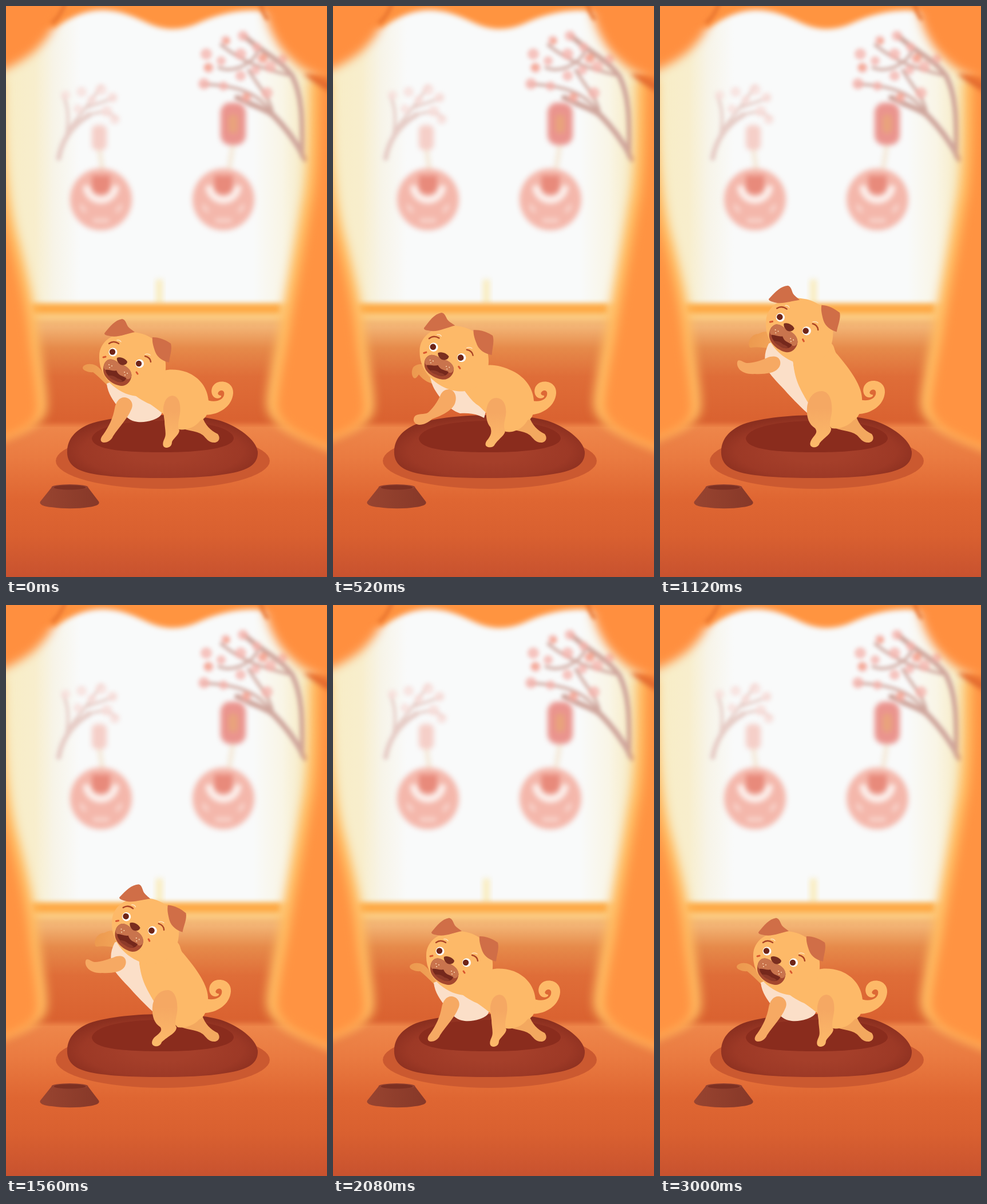
An HTML page that plays this animation: 561x998 px, repeating every 3040 ms.

```html
<!DOCTYPE html>
<html lang="en">
<head>
<meta charset="utf-8">
<title>Jumping puppy</title>
<style>
  html, body { margin: 0; width: 100%; height: 100%; overflow: hidden; background: #d9622f; }
  svg { position: absolute; left: 0; top: 0; width: 100vw; height: 100vh; }
  #room { will-change: transform; }
</style>
</head>
<body>
<svg id="room" viewBox="0 0 561 998" preserveAspectRatio="none">
  <defs>
    <filter id="b3" x="-30%" y="-30%" width="160%" height="160%" color-interpolation-filters="sRGB"><feGaussianBlur stdDeviation="3.6"/></filter>
    <filter id="b5" x="-50%" y="-100%" width="200%" height="300%" color-interpolation-filters="sRGB"><feGaussianBlur stdDeviation="4.6"/></filter>
    <filter id="b9" x="-30%" y="-30%" width="160%" height="160%" color-interpolation-filters="sRGB"><feGaussianBlur stdDeviation="8.5"/></filter>
    <linearGradient id="sky">
      <stop offset="0" stop-color="#f8edc6"/><stop offset=".09" stop-color="#f8eecd"/>
      <stop offset=".15" stop-color="#f7f4e8"/><stop offset=".23" stop-color="#f9fafa"/>
      <stop offset=".77" stop-color="#f9fafa"/><stop offset=".86" stop-color="#f9f5e6"/>
      <stop offset=".93" stop-color="#f7ebc4"/>
    </linearGradient>
    <linearGradient id="wall" x2="0" y2="1">
      <stop offset="0" stop-color="#f6bd78"/><stop offset=".12" stop-color="#f2b273"/>
      <stop offset=".3" stop-color="#e68a4a"/><stop offset=".55" stop-color="#df6d38"/>
      <stop offset="1" stop-color="#d9602f"/>
    </linearGradient>
    <linearGradient id="floor" x2="0" y2="1">
      <stop offset="0" stop-color="#ee864a"/><stop offset=".2" stop-color="#ea7b41"/>
      <stop offset=".48" stop-color="#df6632"/><stop offset=".72" stop-color="#d96030"/>
      <stop offset="1" stop-color="#c8522f"/>
    </linearGradient>
    <radialGradient id="cushion" cy=".58" r=".56">
      <stop offset=".3" stop-color="#a53f2a"/><stop offset=".75" stop-color="#9d3926"/>
      <stop offset="1" stop-color="#8b2f1f"/>
    </radialGradient>
    <linearGradient id="bowl"><stop offset="0" stop-color="#984430"/><stop offset="1" stop-color="#873828"/></linearGradient>
    <g id="medallion">
      <circle r="54" fill="#f4b7ab"/>
      <path d="M-25 -24A25 25 0 0 0 25 -24" fill="none" stroke="#fcefeb" stroke-width="13"/>
      <path d="M-36 10L-27 22M36 10L27 22M-14 37H14" stroke="#f8d6ce" stroke-width="7"/>
      <path d="M-16 -42H16V-22Q14 -9 0 -9T-16 -22Z" fill="#e88a7b"/>
    </g>
    <path id="left" d="M-60 90L-4 130C-4 250 4 340 20 400C36 460 50 520 56 570C62 620 72 670 72 700C70 730 40 745 -60 775Z"/>
    <path id="right" d="M620 90L529 130C528 230 528 300 516 350C504 420 488 500 478 560C468 610 457 660 455 695C458 730 490 750 620 795Z"/>
  </defs>

  <rect width="561" height="545" fill="url(#sky)"/>
  <rect x="262" y="478" width="12" height="44" fill="#f9ecc0" filter="url(#b5)"/>

  <g filter="url(#b3)" fill="none" stroke-linecap="round">
    <g stroke="#cfa69d">
      <path d="M523 268C508 238 490 214 466 190C450 178 430 174 404 160" stroke-width="10"/>
      <path d="M518 262C519 195 517 155 500 122C480 94 450 82 418 54" stroke-width="9"/>
      <path d="M466 188C440 150 400 138 344 137M500 122C460 112 420 104 376 68M440 80C430 100 400 118 372 108M466 188C462 160 440 140 424 112" stroke-width="5"/>
    </g>
    <g stroke="#e6ccc6">
      <path d="M92 266C98 232 116 208 146 190" stroke-width="9"/>
      <path d="M104 232C112 200 108 172 100 158M112 212C130 190 150 165 166 140M146 190C164 184 180 182 192 196M140 178L190 160" stroke-width="5"/>
    </g>
    <g id="blossoms"></g>
  </g>

  <g filter="url(#b5)">
    <path d="M397 240L390 284M163 248L168 284" stroke="#f2e3cc" stroke-width="6"/>
    <rect x="375" y="169" width="44" height="74" rx="17" fill="#ea948e"/>
    <rect x="389" y="190" width="16" height="32" rx="6" fill="#e9a37c"/>
    <rect x="150" y="208" width="26" height="44" rx="9" fill="#f5cfc8"/>
    <use href="#medallion" x="166" y="338"/>
    <use href="#medallion" x="380" y="338"/>
  </g>

  <rect y="538" width="561" height="200" fill="url(#wall)"/>
  <rect x="-30" y="731" width="621" height="300" fill="#ee864a" filter="url(#b5)"/>
  <rect y="736" width="561" height="262" fill="url(#floor)"/>
  <rect x="30" y="520" width="470" height="28" fill="#fccd84" filter="url(#b5)"/>
  <rect x="44" y="522" width="436" height="15" fill="#fda844" filter="url(#b5)"/>

  <use href="#left" fill="#ffbd63" filter="url(#b9)"/>
  <use href="#right" fill="#ffbd63" filter="url(#b9)"/>
  <use href="#left" x="-16" y="4" fill="#ff9342" filter="url(#b9)"/>
  <use href="#right" x="18" y="4" fill="#ff9342" filter="url(#b9)"/>

  <g filter="url(#b5)">
    <path d="M520 118Q545 142 585 158V120Z" fill="#df652c"/>
    <path d="M-20 -30H580V8H445C410 5 370 14 340 28C310 43 280 44 250 31C220 17 200 8 170 7C140 7 115 18 85 38L-20 20Z" fill="#ff9440"/>
  </g>
  <g fill="#ff8f3f">
    <path d="M-60 -60H106C97 10 86 42 62 66C42 90 10 108 -60 136Z" filter="url(#b9)"/>
    <path d="M436 -60C450 20 465 58 490 85C515 111 540 126 620 150V-60Z" filter="url(#b9)"/>
    <path d="M104 -8C98 12 90 22 80 30M444 -8C447 5 450 14 458 24" fill="none" stroke="#e8742f" stroke-width="6" filter="url(#b3)"/>
  </g>

  <ellipse cx="274" cy="795" rx="187" ry="49" fill="#cb5930"/>
  <path d="M107 777C108 757 120 742 145 731C180 719 230 715 275 715C320 715 350 718 375 725C405 735 437 757 440 779C441 800 425 812 385 818C350 824 310 825 270 825C220 825 170 823 140 815C115 808 106 795 107 777Z" fill="url(#cushion)"/>
  <path d="M150 756C152 738 200 725 275 725C350 725 395 738 398 755C398 773 340 780 275 780C205 780 152 776 150 756Z" fill="#8a2c1d"/>

  <path d="M80 841L60 866C57 871 66 875 80 876C100 879 125 879 144 876C158 874 165 871 162 866L143 841Z" fill="url(#bowl)"/>
  <ellipse cx="111.500" cy="841" rx="32" ry="5" fill="#944130"/>
  <ellipse cx="111.500" cy="841.500" rx="28" ry="4" fill="#7c3022"/>
</svg>

<svg viewBox="0 0 561 998" preserveAspectRatio="none">
  <defs>
    <linearGradient id="limb" x2="0" y2="1"><stop offset=".3" stop-color="#f5a863"/><stop offset="1" stop-color="#fdba6a"/></linearGradient>
    <linearGradient id="far"><stop offset="0" stop-color="#ec994f"/><stop offset="1" stop-color="#f2a458"/></linearGradient>
  </defs>
  <path id="paw" fill="url(#far)"/>
  <path d="M343 718C348 732 357 742 370 748C376 756 371 763 364 763C353 763 350 755 344 750C332 741 314 743 300 735Z" fill="#f3a85f"/>
  <path id="chest" fill="#fbdfc8"/>
  <path id="tail" d="M345 686C362 695 379 690 381 680C383 672 376 670 372 674C368 678 372 681 376 681C377 684 372 687 366 685C357 681 356 664 369 658C384 653 398 662 397 677C395 702 368 718 340 714Z" fill="#fdb968"/>
  <path id="body" fill="#fdb968"/>
  <path id="thigh" fill="url(#limb)"/>
  <path id="arm" fill="#f6a963"/>
  <g id="head">
    <path d="M163 612C163 585 190 569 220 570C250 571 277 590 279 625C281 660 262 681 235 682C205 684 161 655 163 612Z" fill="#fdb968"/>
    <path id="ear" d="M172 572C182 560 190 549 203 547C209 548 210 555 213 560C217 565 222 567 225 570C210 573 195 580 182 577C176 576 172 575 172 572Z" fill="#d06e47"/>
    <path d="M256 579C268 579 278 583 288 590C291 600 286 612 285 623C275 621 265 615 261 605C258 596 255 588 256 579Z" fill="#d06e47"/>
    <g fill="#fff"><circle cx="187" cy="605" r="7.500"/><circle cx="233.500" cy="625" r="7.500"/></g>
    <g fill="#6f2518"><circle cx="186" cy="604.500" r="5.200"/><circle cx="232" cy="625" r="5.200"/></g>
    <g fill="none" stroke-linecap="round">
      <path d="M180 590Q188 584 197 590M243 612Q252 614 253 622" stroke="#ad4526" stroke-width="2.400"/>
      <path d="M194 584Q199 583 201 587M243 609Q248 607 252 610" stroke="#fee5c4" stroke-width="1.300"/>
      <path d="M170 614L174 613M228 640L230 643" stroke="#d9572f" stroke-width="3"/>
    </g>
    <g id="muzzle">
      <path d="M176 620C182 615 190 618 198 625C208 628 218 634 219.500 645C219 657 210 664 202 664C188 663 170 650 170 636C170 628 172 623 176 620Z" fill="#a5482f"/>
      <path d="M176 620C182 615 190 618 198 625C210 628 219 635 219.500 645C219 651 213 655 209 650C204 648 197 647 194 639C188 641 180 637 174 636C168 633 172 623 176 620Z" fill="#c9744d"/>
      <path d="M174 636C180 635 187 639 193 637C196 646 203 646 210 650C209 657 199 660 190 654C181 649 174 643 174 636Z" fill="#75281c"/>
      <path d="M178 646Q188 645 195 651Q201 652 204 656Q196 659 189 654Q182 651 178 646Z" fill="#8d3a29"/>
      <g fill="#fbd6b0"><circle cx="180" cy="627" r="1"/><circle cx="185" cy="629" r="1"/><circle cx="181" cy="632" r="1"/><circle cx="207" cy="640" r="1"/><circle cx="212" cy="642" r="1"/><circle cx="208" cy="645" r="1"/></g>
    </g>
    <path d="M194 615C200 612 210 617 212 622C211 628 203 629 199 626C195 623 193 618 194 615Z" fill="#7a2e1f"/>
  </g>
</svg>

<script>
const LOOP = 3040, STEP = 40;
const $ = id => document.getElementById(id);

// head: dx, dy, angle, scale; ear, tail, nudge: dx, dy; muzzle: vertical scale
const rest = {
  head: "0 0 0 1", ear: "0 0", tail: "0 0", nudge: "0 0", muzzle: "1",
  paw: "M186 672C172 658 160 646 152 640C146 641 138 638 135 635C131 630 140 625 148 626C158 626 166 634 172 645L190 660Z",
  chest: "M176 660C178 678 188 690 195 700C205 715 215 724 225 726C240 730 262 724 270 716L277 703C262 698 240 690 228 680L200 650Z",
  body: "M215 650L276 637C284 635 300 634 316 640C340 650 352 668 354 690C356 708 350 722 340 724C330 738 312 742 302 740C290 725 270 708 252 696C238 690 225 682 215 670Z",
  thigh: "M291 681C302 682 306 695 304 712C302 725 299 735 303 742C302 750 292 756 290 762C290 770 284 772 280 772C273 771 273 764 277 756C281 748 277 737 277 725C275 712 274 703 276 697C278 687 283 682 291 681Z",
  arm: "M207 684C218 685 224 695 219 705C212 722 198 735 187 752C184 760 176 763 171 763C164 762 164 756 170 749C180 735 187 720 190 703C192 692 198 684 207 684Z"
};
const breathe = { ...rest, head: "-1 .5 -.5 1", tail: "-1.500 0", nudge: "-3 1" };
const lean = {
  head: "-10 -9.500 -2.700 1.030", ear: "0 0", tail: "-7 0", nudge: "0 0", muzzle: ".92",
  paw: "M182 662C170 660 158 655 150 644C147 648 145 652 141 650C136 645 137 632 143 629C150 625 156 625 162 630L185 650Z",
  chest: "M170 648C172 664 180 675 190 688C200 700 212 709 222 712C235 711 250 712 264 720L268 706C252 694 235 682 226 666L200 640Z",
  body: "M210 640L268 628C280 626 298 630 314 638C338 650 350 670 351 690C352 708 350 722 340 724C330 742 312 746 302 744C290 735 272 715 255 699C240 690 228 670 220 655Z",
  thigh: "M286 685C299 686 304 700 302 715C300 726 297 735 301 742C301 750 290 756 283 766C281 771 275 772 271 771C264 769 266 762 271 757C276 750 278 745 275 736C268 728 267 715 268 706C270 692 276 685 286 685Z",
  arm: "M203 670C212 671 218 682 213 695C208 707 190 716 173 722C167 728 158 732 151 732C141 731 138 722 144 716C152 711 163 715 168 709C178 699 183 690 187 682C190 674 195 670 203 670Z"
};
const stand = {
  head: "23 -59 4 1.020", ear: "-7 3", tail: "-4 -1.500", nudge: "0 0", muzzle: "1",
  paw: "M190 598C180 597 168 595 160 597C156 599 154 592 156 585C159 577 166 573 172 573C178 570 184 568 190 570L195 580Z",
  chest: "M190 590C182 606 181 620 188 636C196 650 210 662 222 676C235 690 247 702 257 711L262 690C246 665 235 650 232 615L200 585Z",
  body: "M232 600L300 590C306 596 304 604 310 609C326 628 352 660 353 685C354 708 345 722 338 724C328 736 310 740 300 738C288 725 268 706 258 692C244 668 233 650 232 610Z",
  thigh: "M283 673C297 674 302 692 300 712C298 724 295 733 299 738C300 748 288 753 279 764C277 771 270 772 267 771C260 769 262 762 266 756C272 748 276 745 271 738C258 730 256 715 257 702C259 685 268 673 283 673Z",
  arm: "M205 614C212 618 212 628 206 634C200 642 180 644 165 643C155 644 146 641 141 637C136 633 133 625 136 620C140 617 147 624 152 624C165 624 180 618 187 615C194 612 200 612 205 614Z"
};
const stretch = { ...stand, head: "23 -61 4.500 1.020", ear: "-3 1" };
const sway = {
  ...stand, head: "23 -58 5 1.020", ear: "0 1",
  thigh: "M283 673C296 674 301 692 299 712C297 724 294 733 298 738C298 748 284 753 272 764C270 771 263 772 260 771C253 769 254 762 259 756C267 749 274 745 270 738C257 730 255 715 256 702C258 685 268 673 283 673Z",
  arm: "M205 615C211 619 211 628 206 634C200 642 182 644 168 643C159 644 150 641 145 637C140 633 137 625 140 620C144 617 150 624 155 624C167 624 181 618 188 616C195 613 200 613 205 615Z"
};

const smooth = k => k * k * (3 - 2 * k);
const easeIn = k => k ** 3;
const easeOut = k => 1 - (1 - k) ** 2;
// time, pose, easing towards the pose
const keys = [
  [0, rest], [120, rest, smooth], [520, lean, easeIn], [900, stand, easeOut],
  [1120, stand, smooth], [1340, stretch, smooth], [1570, sway, smooth],
  [1970, rest, smooth], [2080, rest, smooth], [2480, breathe, smooth],
  [2960, rest, smooth], [LOOP, rest, smooth]
];

const NUMBER = /-?\d*\.?\d+/g;
function mix(a, b, k) {
  const ends = b.match(NUMBER);
  let i = 0;
  return a.replace(NUMBER, n => +(+n + (ends[i++] - n) * k).toFixed(2));
}

function draw(time) {
  const n = keys.findIndex(key => key[0] > time);
  const [t0, from] = keys[n - 1], [t1, to, ease] = keys[n];
  const k = ease((time - t0) / (t1 - t0));
  const pose = {};
  for (const part in rest) pose[part] = mix(from[part], to[part], k);

  for (const part of ["paw", "chest", "body", "thigh", "arm"]) $(part).setAttribute("d", pose[part]);
  const [dx, dy, angle, scale] = pose.head.split(" ");
  const place = (id, value) => $(id).setAttribute("transform", value);
  place("head", `translate(${dx} ${dy}) translate(210 615) rotate(${angle}) scale(${scale}) translate(-210 -615)`);
  place("ear", `translate(${pose.ear})`);
  place("tail", `translate(${pose.tail})`);
  place("paw", `translate(${pose.nudge})`);
  place("muzzle", `translate(0 622) scale(1 ${pose.muzzle}) translate(0 -622)`);
}

function scatter(points, color, r) {
  $("blossoms").innerHTML += points.map(([x, y], i) =>
    `<circle cx="${x}" cy="${y}" r="${r + i % 3}" fill="${color}" opacity=".75"/>`).join("");
}
scatter([[384, 60], [414, 52], [350, 84], [376, 96], [354, 108], [410, 84], [438, 72], [448, 92],
  [462, 106], [436, 112], [410, 122], [346, 136], [380, 140], [420, 160], [456, 152], [484, 92]], "#f4b0aa", 8);
scatter([[386, 62], [353, 107], [450, 90], [420, 158]], "#f4a089", 5);
scatter([[104, 156], [132, 150], [166, 146], [150, 164], [186, 160], [176, 184], [126, 180], [190, 198]], "#f7dcd8", 8);

const start = performance.now();
function tick() {
  const time = (performance.now() - start) % LOOP;
  draw(Math.floor(time / STEP) * STEP);
  requestAnimationFrame(tick);
}
tick();
</script>
</body>
</html>
```
